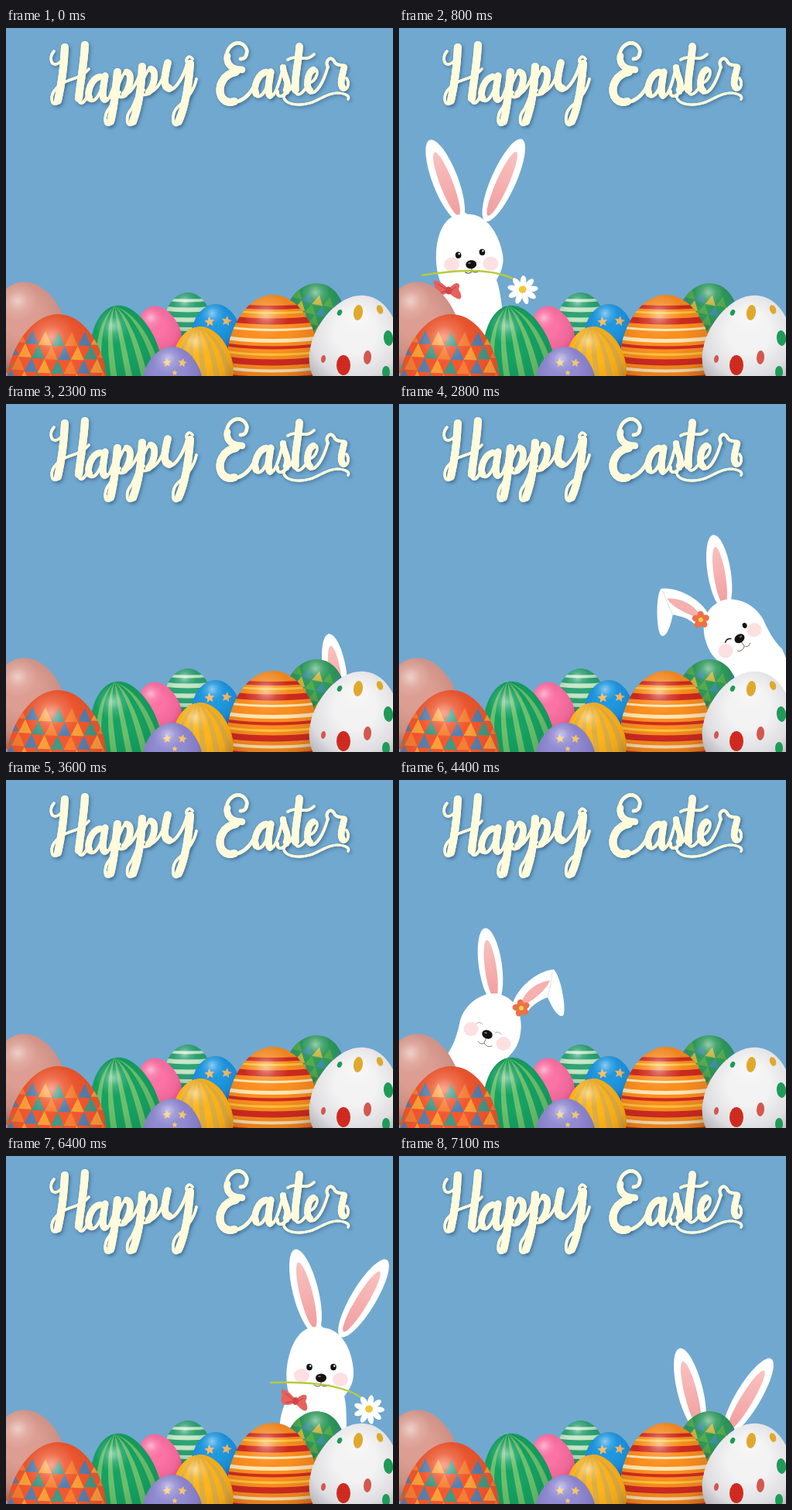
An HTML page with a canvas that plays this animation: 500 by 450 pixels, repeating every 7.2 s.

```html
<!DOCTYPE html>
<html lang="en">
<head>
<meta charset="utf-8">
<title>Happy Easter</title>
<style>
html, body { margin: 0; width: 100%; height: 100%; overflow: hidden; background: #70a8d0; }
canvas { display: block; }
</style>
</head>
<body>
<canvas id="stage" width="500" height="450" role="img" aria-label="Happy Easter"></canvas>
<script>
const ctx = document.getElementById('stage').getContext('2d');
const LOOP = 7200, TAU = Math.PI * 2, DEG = Math.PI / 180;

function fill(d, color) {
  ctx.fillStyle = color;
  ctx.fill(new Path2D(d));
}
function line(d, color, width) {
  ctx.strokeStyle = color;
  ctx.lineWidth = width;
  ctx.lineCap = ctx.lineJoin = 'round';
  ctx.stroke(new Path2D(d));
}
function oval(x, y, rx, ry, color, rot = 0) {
  ctx.beginPath();
  ctx.ellipse(x, y, rx, ry, rot * DEG, 0, TAU);
  ctx.fillStyle = color;
  ctx.fill();
}
function star(x, y, r, color, rot = 0) {
  ctx.beginPath();
  for (let i = 0; i < 10; i++) {
    const a = rot * DEG - Math.PI / 2 + i * Math.PI / 5, q = i % 2 ? r * 0.45 : r;
    ctx.lineTo(x + q * Math.cos(a), y + q * Math.sin(a));
  }
  ctx.fillStyle = color;
  ctx.fill();
}
function turn(x, y, angle) {
  ctx.translate(x, y);
  ctx.rotate(angle * DEG);
  ctx.translate(-x, -y);
}

// ---- lettering: [stroke width, path] ----
const letters = [
  // H
  [3.5, 'M62 30C54 39 59 53 70 44C75 39 75 31 77 26'],
  [10, 'M76 25C75 48 72 72 67 94'],
  [3.5, 'M67 97C58 103 56 87 65 78C77 64 96 68 107 53'],
  [10, 'M102 22C101 46 96 70 94 91'],
  [4, 'M94 93C96 101 102 96 106 86'],
  // a
  [8.5, 'M121 63C110 66 104 83 108 91'],
  [4, 'M108 93C115 99 124 82 127 66'],
  [9, 'M128 62C126 76 123 88 127 92'],
  [3.5, 'M127 95C133 96 137 82 142 66'],
  // p
  [10, 'M144 57C142 80 140 102 135 121'],
  [3.5, 'M135 124C126 130 126 112 134 103C143 86 146 64 155 56'],
  [8.5, 'M156 57C164 59 160 78 153 86'],
  [3.5, 'M153 88C147 92 144 87 147 83M154 87C162 83 169 71 173 59'],
  // p
  [10, 'M176 50C175 78 171 102 164 121'],
  [3.5, 'M164 124C155 130 154 114 162 105C172 86 177 60 186 52'],
  [8.5, 'M187 53C196 56 191 75 184 83'],
  [3.5, 'M184 85C177 89 174 84 178 80M185 84C196 80 203 66 207 50'],
  // y
  [9.5, 'M209 45C205 62 202 76 211 78'],
  [4, 'M211 81C220 79 230 62 234 46'],
  [10, 'M238 46C236 74 231 103 223 121'],
  [3.5, 'M223 124C214 131 213 111 222 102C232 93 242 84 246 66M234 46C231 39 237 34 241 40'],
  // E
  [4.5, 'M303 40C311 41 314 29 308 23C299 14 286 23 285 36'],
  [8.5, 'M286 36C284 48 293 54 305 54'],
  [10, 'M297 57C281 59 273 76 278 88C282 96 289 97 295 95'],
  [4.5, 'M295 96C309 94 317 84 323 70'],
  // a
  [8.5, 'M336 57C326 59 319 76 323 85'],
  [4, 'M323 87C330 94 339 76 342 60'],
  [9, 'M342 57C340 70 337 83 341 87'],
  [3.5, 'M341 90C349 88 354 68 358 50'],
  // s
  [8, 'M358 51C359 63 367 70 362 80'],
  [4, 'M362 82C358 91 349 89 351 82M362 84C369 79 372 71 375 62'],
  // t
  [9.5, 'M379 24C378 46 372 66 374 80'],
  [3.5, 'M374 83C379 91 386 80 391 72M364 41C376 33 386 46 398 34'],
  // e
  [3.5, 'M391 72C403 67 405 52 398 53'],
  [8.5, 'M397 54C389 58 387 77 393 81'],
  [3.5, 'M393 84C403 85 411 67 416 50'],
  // r
  [4, 'M416 51C411 42 420 35 424 43C427 50 434 47 438 49'],
  [8.5, 'M437 51C434 62 431 73 435 77'],
  [3.5, 'M435 80C442 81 444 71 440 65'],
  // swash
  [3.2, 'M364 84C354 87 359 98 376 99C399 101 410 84 428 84C439 84 445 89 442 92']
];
function drawTitle() {
  for (const shadow of [true, false]) {
    ctx.save();
    if (shadow) {
      ctx.shadowColor = 'rgba(45,80,115,.55)';
      ctx.shadowBlur = 4;
      ctx.shadowOffsetX = ctx.shadowOffsetY = 2;
    }
    for (const [width, d] of letters) line(d, '#fffbdc', width);
    ctx.restore();
  }
}

// ---- eggs ----
function eggPath(rx, ry) {
  ctx.beginPath();
  ctx.moveTo(0, -ry);
  ctx.bezierCurveTo(rx * 0.58, -ry, rx, -ry * 0.35, rx, ry * 0.15);
  ctx.bezierCurveTo(rx, ry * 0.65, rx * 0.55, ry, 0, ry);
  ctx.bezierCurveTo(-rx * 0.55, ry, -rx, ry * 0.65, -rx, ry * 0.15);
  ctx.bezierCurveTo(-rx, -ry * 0.35, -rx * 0.58, -ry, 0, -ry);
}
function glow(x, y, r0, r1, stops, rx, ry) {
  const g = ctx.createRadialGradient(x, y, r0, x, y, r1);
  stops.forEach((color, i) => g.addColorStop(i / (stops.length - 1), color));
  ctx.fillStyle = g;
  ctx.fillRect(-rx, -ry, rx * 2, ry * 2);
}
function egg(x, y, rx, ry, rot, color, pattern, dark = '70,15,10') {
  ctx.save();
  ctx.translate(x, y);
  ctx.rotate(rot * DEG);
  eggPath(rx, ry);
  ctx.clip();
  ctx.fillStyle = color;
  ctx.fillRect(-rx, -ry, rx * 2, ry * 2);
  if (pattern) pattern(rx, ry);
  glow(-rx * 0.1, -ry * 0.3, rx * 0.45, ry * 1.3,
    [`rgba(${dark},0)`, `rgba(${dark},.12)`, `rgba(${dark},.5)`], rx, ry);
  glow(-rx * 0.15, -ry * 0.62, 0, rx * 0.5,
    ['rgba(255,255,255,.5)', 'rgba(255,255,255,.15)', 'rgba(255,255,255,0)'], rx, ry);
  ctx.restore();
}
// bands: [offset, thickness, colour]
const bands = (list, bend) => rx => {
  for (const [y, w, color] of list) {
    line(`M${-rx - 5} ${y}Q0 ${y + bend} ${rx + 5} ${y}`, color, w);
  }
};
const triangles = (w, h, top, rows, colors) => rx => {
  for (let r = 0; r < rows; r++) {
    for (let i = -5; i <= 5; i++) {
      const x = (i + (r % 2) / 2) * w, y = top + r * h + 5 - 5 * (x / rx) ** 2;
      fill(`M${x - w / 2} ${y + h}L${x} ${y}L${x + w / 2} ${y + h}Z`,
        colors[(i + 10 + r * 2) % colors.length]);
    }
  }
};
const meridians = (color, half) => (rx, ry) => {
  for (const k of [-0.85, -0.42, 0.02, 0.46, 0.88]) {
    const a = rx * (k - half), b = rx * (k + half);
    fill(`M0 ${-ry}Q${a} ${-ry * 0.6} ${a} ${ry}L${b} ${ry}Q${b} ${-ry * 0.6} 0 ${-ry}Z`, color);
  }
};

const RED = '#cf2a20', CREAM = '#fde6b4', YELLOW = '#fdc43c', GOLD = '#e0a92e', LEAF = '#1f9a58';

function drawEggs() {
  egg(235, 373, 30, 31, 0, '#2fa374', bands([
    [-23, 4, '#c4e6c6'], [-11, 6, '#c4e6c6'], [2, 6, '#c4e6c6'], [14, 5, '#c4e6c6']], 5), '0,60,50');
  egg(271, 389, 31, 32, 0, '#1f98e0', () => {
    star(-8, -9, 7, '#f7b75f', -8);
    star(14, -10, 7, '#f7b75f', 10);
  }, '5,30,110');
  egg(401, 364, 37, 34, 12, '#2f9a5c',
    triangles(14, 13, -24, 4, ['#3f8f9c', '#c9b23f', '#57a94e']), '0,50,40');
  egg(27, 391, 52, 63, -6, '#dc9d92', null, '85,30,20');
  egg(197, 396, 29, 37, -14, '#fb72a4', null, '150,10,60');
  egg(153, 424, 46, 66, -11, '#16a263', meridians('#6cc06c', 0.09), '0,50,30');
  egg(345, 415, 59, 70, 0, '#fa8f20', bands([
    [-58, 5, RED], [-51, 3, YELLOW], [-40, 8, RED], [-29, 3, CREAM],
    [-15, 5, CREAM], [-6, 4, RED], [3, 3, YELLOW], [13, 8, RED], [24, 4, CREAM], [34, 5, RED]], 9));
  egg(253, 434, 40, 48, -6, '#fdb51c', meridians('#dcae42', 0.1), '130,60,0');
  egg(66, 450, 65, 80, 2, '#f2582f',
    triangles(17, 18, -62, 5, ['#5580ad', '#f9a03a', '#3f9a86', '#f57f32']));
  egg(215, 454, 39, 42, 0, '#918bd2', () => {
    star(-7, -21, 6, '#f8c765', -8);
    star(13, -21, 6, '#f8c765', 10);
    star(3, -8, 4, '#f8c765');
  }, '40,20,100');
  egg(453, 415, 59, 70, 12, '#f3f3f4', null, '70,70,85');
  oval(455, 368, 6, 10, GOLD, 8);
  oval(483, 364, 4, 6, GOLD, -20);
  oval(431, 368, 3, 4, LEAF, 25);
  oval(436, 436, 9, 13, RED);
  oval(467, 426, 5, 9, '#d4584f', 4);
  oval(494, 401, 6, 10, LEAF, -6);
  oval(410, 428, 3, 5, '#d4584f', 10);
  oval(491, 445, 5, 8, LEAF);
}

// ---- rabbits ----
const WHITE = '#fff', PINK = '#f6b0ae', INK = '#15110f';

function ear(x, y, rx, ry, rot) {
  oval(x, y, rx, ry, WHITE, rot);
  ctx.save();
  turn(x, y, rot);
  const g = ctx.createLinearGradient(0, y - ry, 0, y + ry);
  g.addColorStop(0, '#f9c9c5');
  g.addColorStop(1, '#f29a9c');
  oval(x, y + 5, rx * 0.5, ry * 0.78, g);
  ctx.restore();
}
function nose(x, y, rot) {
  oval(x, y, 7, 5.5, INK, rot);
  oval(x - 2, y - 2, 2, 1, '#777', rot);
}
function eye(x, y) {
  oval(x, y, 3.8, 4.2, INK);
  oval(x + 1.2, y - 1.5, 1.2, 1.2, WHITE);
}

function daisyRabbit(alt) {
  turn(405, 285, alt ? 0 : -7);
  ear(387, 175, 16.5, 56, -14);
  ear(462, 184, 16, 58, 31);
  fill('M398 221L403 223L406 218L410 222C433 224 447 249 449 278C450 294 442 304 437 311' +
    'C441 325 440 345 440 470H354V345C355 328 364 315 365 305C357 280 367 223 398 221Z', WHITE);
  oval(382, 284, 10, 9, '#fce0e2');
  oval(432, 289, 10, 9, '#fce0e2');
  eye(392, 273);
  eye(423, 273);
  line('M407 290V296M398 296Q403 300 407 296Q412 300 417 296', '#5a4a48', 1);
  nose(407, 287, 0);
  line('M342 293C378 292 438 292 466 318', '#b4cc3c', 2.5);
  for (let i = 0; i < 9; i++) {
    const a = i * TAU / 9;
    oval(469 + 12 * Math.cos(a), 328 + 11 * Math.sin(a), 8, 3.8, WHITE, a / DEG);
  }
  oval(469, 327, 5, 4.5, '#f2c832');
  fill('M374 315C363 300 352 298 357 309C353 319 357 326 374 319Z', '#e8615c');
  fill('M374 315C385 305 392 308 387 317C392 328 389 337 374 320Z', '#e8615c');
  line('M361 307L371 315M362 319L371 317M384 313L378 317', '#bc3f43', 1);
  oval(374, 317, 4, 5, '#cf4649');
}

function lopRabbit(alt) {
  turn(140, 312, alt ? 12 : 0);
  ctx.save();
  turn(122, 285, alt ? 5 : 0);
  ear(118, 240, 15, 49, -8);
  ctx.restore();
  fill('M146 292C152 268 180 246 200 245C208 252 216 290 213 303C209 310 200 300 192 281C184 284 172 290 166 300Z', WHITE);
  fill('M158 288C163 272 180 261 195 259C191 271 175 283 164 290Z', PINK);
  line('M198 249Q196 267 192 281', '#e6e4e8', 1.2);
  fill('M63 354C72 340 76 326 79 311C86 288 107 275 125 276C148 279 161 300 157 327' +
    'C155 345 145 355 137 362L140 470H40Z', WHITE);
  oval(93, 322, 9.5, 9, '#fce0e2');
  oval(135, 341, 9.5, 9, '#fce0e2');
  if (alt) {
    oval(104, 314, 3, 3.5, INK);
    line('M125 327Q130 325 133 330', INK, 1.5);
  } else {
    line('M100 315Q104 311 108 316', '#b9a9a8', 1);
    line('M124 327Q129 324 132 329', '#b9a9a8', 1);
  }
  line('M113 333L110 340M102 338Q106 343 110 340Q114 347 120 344', '#8a7876', 1);
  nose(114, 329, 23);
  for (let i = 0; i < 5; i++) {
    const a = (i * 72 - 100) * DEG;
    oval(158 + 6 * Math.cos(a), 295 + 6 * Math.sin(a), 5.5, 4.3, '#ee7044', a / DEG);
  }
  oval(158, 295, 3, 3, '#f8cf55');
}

// local time, shift x, shift y, second pose
const steps = [
  [0, -11, 128, 1], [100, -6, 85, 1], [200, 0, 44, 1],
  [300, 0, 0, 0], [500, 0, 0, 1], [700, 0, 0, 0], [900, 0, 0, 1],
  [1100, 0, 44, 1], [1200, -11, 128, 1]
];
const STAY = 1300;
// start, rabbit, base x, base y, mirror
const visits = [
  [500, daisyRabbit, -314, 19, 1],
  [2300, lopRabbit, 551, -20, -1],
  [4100, lopRabbit, 0, 0, 1],
  [5900, daisyRabbit, 0, 0, 1]
];

function drawRabbit(t) {
  const visit = visits.find(([start]) => t >= start && t < start + STAY);
  if (!visit) return;
  const [start, rabbit, x, y, flip] = visit;
  const [, dx, dy, alt] = steps.filter(s => s[0] <= t - start).pop();
  ctx.save();
  ctx.translate(x, y);
  ctx.scale(flip, 1);
  ctx.translate(dx, dy);
  rabbit(alt);
  ctx.restore();
}

function frame() {
  const t = performance.now() % LOOP;
  ctx.fillStyle = '#70a8d0';
  ctx.fillRect(0, 0, 500, 450);
  drawTitle();
  drawRabbit(t);
  drawEggs();
  requestAnimationFrame(frame);
}
frame();
</script>
</body>
</html>
```
